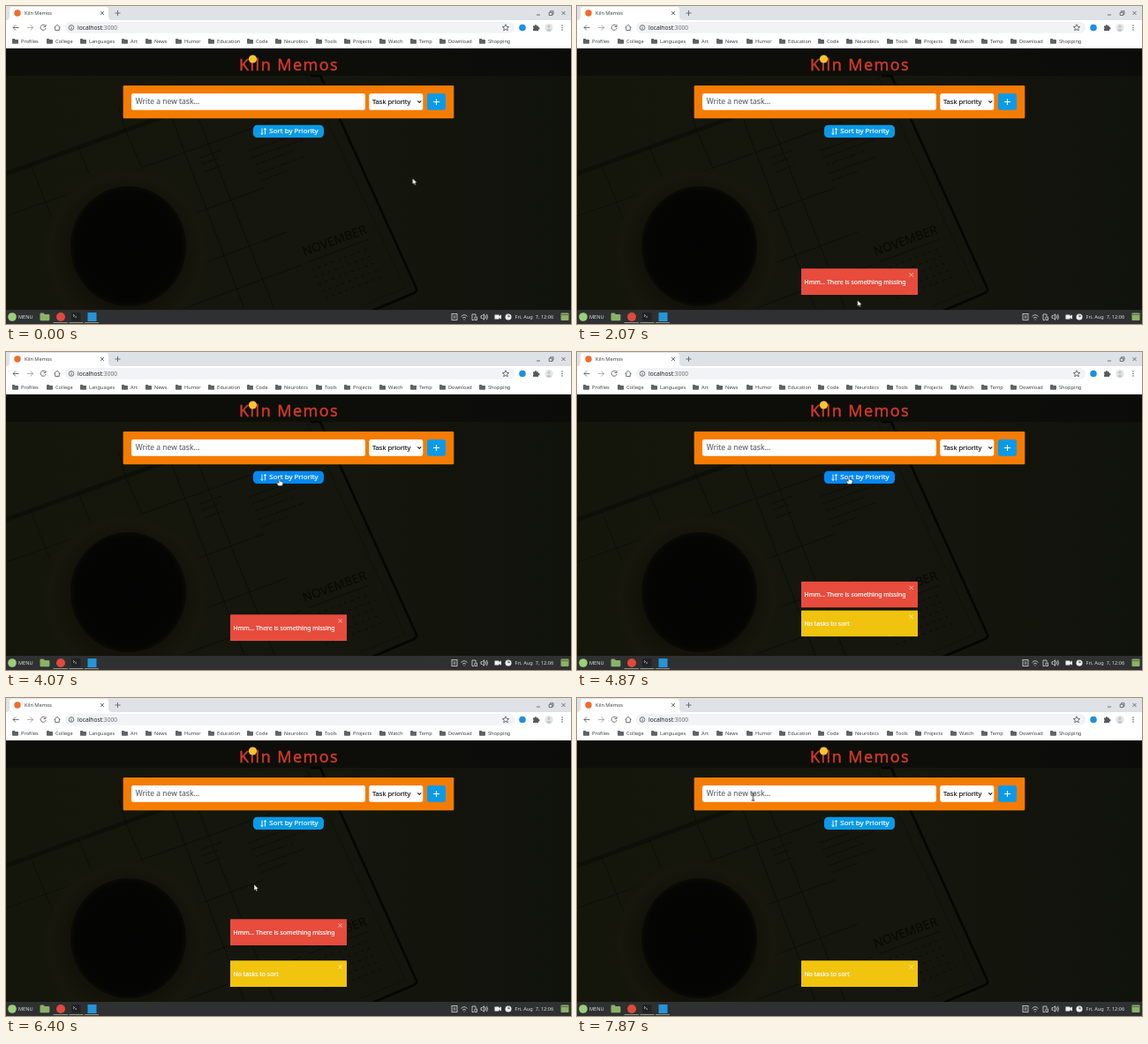
Recreate the animation shown at these times as an HTML page. Size 640 by 360 pixels, loop 8000 ms.

```html
<!DOCTYPE html>
<html lang="en">
<head>
<meta charset="utf-8">
<title>Kiln Memos</title>
<style>
html, body { margin: 0; width: 100%; height: 100%; overflow: hidden; background: #14150d; }
svg { display: block; width: 100vw; height: 100vh; font-family: "Noto Sans", "Open Sans", sans-serif; }
.ui { font-size: 5.65px; fill: #3c4043; }
.line { fill: none; stroke: #5f6368; stroke-width: .9; }
.tray { fill: none; stroke: #ddd; stroke-width: .8; }
.label { fill: #fff; stroke: #fff; stroke-width: .2; }
.anim { animation-duration: 8s; animation-iteration-count: infinite; animation-timing-function: linear; }

/* Toasts bounce in from below, and the first drops out again. */
.error { animation-name: error; animation-timing-function: ease; }
.warning { animation-name: warning; }
.lift { animation-name: lift; animation-timing-function: step-end; }
@keyframes error {
  0% { transform: translateY(1405px); opacity: 0; }
  14.89% { transform: translateY(1405px); opacity: 0; animation-timing-function: cubic-bezier(.215,.61,.355,1); }
  20.52% { transform: translateY(-9.4px); opacity: 1; animation-timing-function: cubic-bezier(.215,.61,.355,1); }
  21.92% { transform: translateY(4.7px); animation-timing-function: cubic-bezier(.215,.61,.355,1); }
  23.33% { transform: translateY(-2.35px); animation-timing-function: cubic-bezier(.215,.61,.355,1); }
  24.27%, 76.35% { transform: none; }
  78.23% { transform: translateY(4.7px); }
  80.1%, 80.57% { transform: translateY(-9.4px); opacity: 1; }
  85.73%, 100% { transform: translateY(937px); opacity: 0; }
}
@keyframes warning {
  0% { transform: translateY(1405px); opacity: 0; }
  55.81% { transform: translateY(1405px); opacity: 0; animation-timing-function: cubic-bezier(.215,.61,.355,1); }
  61.44% { transform: translateY(-9.4px); opacity: 1; animation-timing-function: cubic-bezier(.215,.61,.355,1); }
  62.84% { transform: translateY(4.7px); animation-timing-function: cubic-bezier(.215,.61,.355,1); }
  64.25% { transform: translateY(-2.35px); animation-timing-function: cubic-bezier(.215,.61,.355,1); }
  65.19%, 100% { transform: none; opacity: 1; }
}
@keyframes lift { 0% { transform: none; } 55.81%, 100% { transform: translateY(-37.5px); } }

.button { fill: #0a9ae8; }
.add { animation-name: add; }
.sort { animation-name: sort; }
@keyframes add { 0%, 8.1%, 22%, 100% { fill: #0a9ae8; } 10%, 20.4% { fill: #0a6cf8; } }
@keyframes sort { 0%, 49.9%, 64%, 100% { fill: #0a9ae8; } 50.9%, 62.2% { fill: #0489f5; } }

.pointer { animation-name: travel; animation-timing-function: ease-in-out; }
@keyframes travel {
  0%, .88% { transform: translate(460.5px,195px); }
  10.88% { transform: translate(489px,105px); }
  11.6%, 19.13% { transform: translate(490px,104px); }
  25.88% { transform: translate(317.7px,333px); animation-timing-function: linear; }
  29.1% { transform: translate(310px,323px); animation-timing-function: ease-out; }
  30.9% { transform: translate(306.5px,318.5px); }
  36.6% { transform: translate(306.5px,318.5px); animation-timing-function: ease-in; }
  41.6% { transform: translate(387px,235px); animation-timing-function: linear; }
  46.6% { transform: translate(355px,165px); animation-timing-function: linear; }
  50.9% { transform: translate(309.5px,144px); animation-timing-function: ease-out; }
  53.4%, 60.9% { transform: translate(308px,142px); }
  70%, 70.9% { transform: translate(287px,300.5px); }
  73.4% { transform: translate(288px,311px); }
  80% { transform: translate(281px,211px); animation-timing-function: linear; }
  80.9% { transform: translate(279px,206px); }
  90%, 100% { transform: translate(199.5px,112px); }
}
.arrow, .hand, .beam, .caret { animation-timing-function: step-end; }
.arrow { animation-name: arrow; }
.hand { animation-name: hand; }
.beam { animation-name: beam; }
.caret { animation-name: caret; }
@keyframes arrow {
  0%, 20.4%, 38.8%, 62.2%, 76.8% { opacity: 1; }
  8.1%, 27.9%, 49.9%, 66.8%, 88.4%, 100% { opacity: 0; }
}
@keyframes hand {
  0%, 20.4%, 38.8%, 62.2%, 76.8%, 100% { opacity: 0; }
  8.1%, 27.9%, 49.9%, 66.8% { opacity: 1; }
}
@keyframes beam { 0% { opacity: 0; } 88.4%, 100% { opacity: 1; } }
@keyframes caret { 0%, 98.3%, 100% { opacity: 0; } 91.6% { opacity: 1; } }
</style>
</head>
<body>
<svg viewBox="0 0 640 360" xmlns="http://www.w3.org/2000/svg">
  <defs>
    <clipPath id="page"><rect y="48" width="640" height="296"/></clipPath>
    <linearGradient id="desk"><stop stop-color="#15160b"/><stop offset=".6" stop-color="#15160d"/><stop offset="1" stop-color="#10120c"/></linearGradient>
    <radialGradient id="saucer"><stop offset=".66" stop-color="#121209"/><stop offset=".88" stop-color="#17170d"/><stop offset="1" stop-color="#16160b" stop-opacity="0"/></radialGradient>
    <radialGradient id="coffee"><stop stop-color="#030303"/><stop offset=".93" stop-color="#050503"/><stop offset="1" stop-color="#0a0a06"/></radialGradient>
    <g id="folder"><path d="M0 .8Q0 0 .8 0H2.6L3.5 1H6.2Q7 1 7 1.8V5Q7 5.7 6.2 5.7H.8Q0 5.7 0 5Z"/></g>
    <path id="close" d="M376.5 302.3L380.7 306.5M380.7 302.3L376.5 306.5" stroke="#fff" stroke-width=".8" opacity=".8"/>
  </defs>

  <!-- page -->
  <g clip-path="url(#page)">
    <rect y="48" width="640" height="296" fill="url(#desk)"/>
    <g fill="none" stroke="#0a0a05" stroke-width="1">
      <path d="M0 190L215 112" stroke-width="5" opacity=".6"/>
      <path d="M0 238L300 131M205 238L292 206M200 300L318 256M200 343L335 293" opacity=".65"/>
      <path d="M28 180L60 260M82 160L105 215M135 140L165 208M186 122L270 343M212 112L304 343M128 115L135 140" opacity=".65"/>
      <path d="M345 79L356 79L465 320Q466 323 462 325L415 345" stroke="#050503" stroke-width="2.6"/>
      <path d="M340 79L452 319L402 340" opacity=".4"/>
      <g stroke="#080804" stroke-width="1.1" stroke-dasharray="5 1.5 8 2 3 1.5" opacity=".5">
        <path d="M220 172L244 163M222 179L240 172M225 188L246 180"/>
        <path d="M275 164L330 145M278 172L337 151M282 180L326 164M285 190L340 170M288 198L318 187"/>
      </g>
      <g stroke="#080804" stroke-width="1.3" stroke-dasharray="3 5" opacity=".55">
        <path d="M346 299L414 273M350 307L418 281M354 315L422 289M358 323L426 297M362 331L430 305"/>
      </g>
      <path d="M342 290L411 264" opacity=".7"/>
    </g>
    <text transform="translate(338 283) rotate(-20)" font-size="14" fill="#090905">NOVEMBER</text>
    <ellipse cx="136" cy="278" rx="98" ry="100" fill="url(#saucer)"/>
    <ellipse cx="138.5" cy="272" rx="65.5" ry="68" fill="url(#coffee)"/>
    <rect y="48" width="640" height="31" fill="#080909" opacity=".55"/>
    <text x="264" y="73" font-size="18" letter-spacing="1.4" fill="#d33a2c" stroke="#d33a2c" stroke-width=".4">Kiln Memos</text>
    <circle cx="279.5" cy="60" r="4.6" fill="#fbc52d"/>

    <rect x="132.7" y="90" width="374.6" height="37.3" rx="1.2" fill="#f57c00"/>
    <rect x="142" y="99" width="265" height="18.8" rx="2.3" fill="#fff"/>
    <text x="146.7" y="111.3" font-size="8.5" fill="#5d656c" stroke="#5d656c" stroke-width=".12">Write a new task...</text>
    <path class="anim caret" d="M146.7 103.5V113.5" stroke="#333" stroke-width=".6"/>
    <rect x="411.3" y="99" width="61" height="18.8" rx="2.3" fill="#fff"/>
    <text x="415" y="111.2" font-size="7.56" fill="#111" stroke="#111" stroke-width=".15">Task priority</text>
    <path d="M466.3 107.3L468.3 109.3L470.3 107.3" fill="none" stroke="#111" stroke-width="1.1"/>
    <rect class="button anim add" x="477" y="99" width="21" height="18.8" rx="2.3"/>
    <path d="M487.5 105V112M484 108.5H491" stroke="#fff" stroke-width="1.1"/>

    <rect class="button anim sort" x="280" y="134.8" width="80" height="14.2" rx="4.5"/>
    <path d="M290 138.5V145.5M288.5 143.8L290 145.5L291.5 143.8M293.5 145.5V138.5M292 140.2L293.5 138.5L295 140.2" fill="none" stroke="#fff" stroke-width=".9"/>
    <text class="label" x="298.3" y="144.4" font-size="7.95">Sort by Priority</text>

    <g class="anim lift"><g class="anim error">
      <rect x="254" y="297.2" width="132" height="29.8" rx=".5" fill="#e74c3c"/>
      <text class="label" x="257.5" y="314.7" font-size="6.95">Hmm... There is something missing</text>
      <use href="#close"/>
    </g></g>
    <g class="anim warning">
      <rect x="254" y="297.2" width="132" height="29.8" rx=".5" fill="#f1c40f"/>
      <text class="label" x="257.5" y="314.7" font-size="6.95">No tasks to sort</text>
      <use href="#close"/>
    </g>
  </g>

  <!-- browser -->
  <rect width="640" height="48" fill="#fff"/>
  <rect width="640" height="16" fill="#dee1e6"/>
  <path d="M0 16Q4 16 4 12V4Q4 1 7.5 1H113Q116 1 116 4V12Q116 16 120 16Z" fill="#fff"/>
  <circle cx="13" cy="8" r="3.7" fill="#f4692c"/>
  <text class="ui" x="21" y="10.1">Kiln Memos</text>
  <path class="line" d="M107 6L111 10M111 6L107 10M123.5 8H129.5M126.5 5V11"/>
  <path class="line" d="M601 10H605M615.2 7.2H618.8V10.5H615.2ZM616.5 7V5.8H620V9.3H619M629.5 6L633.5 10M633.5 6L629.5 10"/>
  <path class="line" d="M14.5 24.5H8M11 21.5L8 24.5L11 27.5"/>
  <path class="line" d="M24 24.5H30.5M27.5 21.5L30.5 24.5L27.5 27.5" opacity=".55"/>
  <path class="line" d="M43.300 22.300A3 3 0 1 0 44 25M44 21V23.500H41.500" transform="translate(1 0)"/>
  <path class="line" d="M54.500 24.500L58 21.300L61.500 24.500M55.700 24V27.500H60.300V24"/>
  <rect x="67" y="18" width="509" height="12.8" rx="6.4" fill="#f1f3f4"/>
  <circle class="line" cx="74" cy="24.5" r="2.8"/>
  <path class="line" d="M74 24V26.2M74 22.7V23.3"/>
  <text x="81" y="26.9" font-size="6.65" fill="#202124">localhost<tspan fill="#6b7075">:3000</tspan></text>
  <path class="line" d="M566 20.8L567.1 23.3L569.7 23.5L567.7 25.2L568.3 27.8L566 26.4L563.7 27.8L564.3 25.2L562.3 23.5L564.9 23.3Z" stroke-width=".7"/>
  <circle cx="585" cy="24.5" r="3.8" fill="#1b91df"/>
  <path d="M597 22.5H598.7A1.3 1.3 0 1 1 601.3 22.5H603V24.2A1.2 1.2 0 1 1 603 26.5V28H597V26.2A1.1 1.1 0 0 0 597 24.2Z" fill="#55595e"/>
  <circle cx="615" cy="24.5" r="4.6" fill="#e3e5e8"/>
  <path d="M615 21.5A1.7 1.7 0 1 1 614.9 21.5M611.8 27.8Q615 23.8 618.2 27.8Q615 30 611.8 27.8Z" fill="#c3c8cd"/>
  <g fill="#5f6368"><circle cx="630" cy="22" r=".8"/><circle cx="630" cy="24.5" r=".8"/><circle cx="630" cy="27" r=".8"/></g>
  <g id="bookmarks" class="ui"></g>

  <!-- taskbar -->
  <rect y="344" width="640" height="16" fill="#2f3031"/>
  <circle cx="7" cy="352" r="4.8" fill="#9bcf7a"/>
  <text class="ui" x="14" y="354.1" style="fill:#ddd">MENU</text>
  <use href="#folder" transform="translate(38.5 347.5) scale(1.55)" fill="#8bb267"/>
  <path d="M53.5 358.5H70M71.5 358.5H87.5M89 358.5H105" stroke="#a9b5a0" stroke-width=".8"/>
  <circle cx="62" cy="352" r="5" fill="#df4a3c"/>
  <rect x="74" y="347" width="10.5" height="9.5" rx="1" fill="#202223"/>
  <path class="tray" d="M76 349.3L77.5 350.5L76 351.7M78.2 352H80" stroke-width=".6"/>
  <rect x="92.5" y="347" width="10" height="10" fill="#2495d8"/>
  <g class="tray">
    <rect x="505" y="348.5" width="6" height="7"/><path d="M506.5 351H509.5M506.5 353H509.5"/>
    <path d="M515.5 351.5Q519 347.8 522.5 351.5M517 353.3Q519 351.3 521 353.3M519 354.5V355.5"/>
    <path d="M528 349H532V351M528 349V355.5H530M531 352H533.5V355.5H531Z"/>
    <path d="M538 350.7H539.5L541.5 348.7V355.3L539.5 353.3H538ZM543 350Q544.5 352 543 354M544.5 348.8Q546.5 352 544.5 355.2"/>
  </g>
  <path d="M553.5 349.5H558.5V351L561 349.5V354.5L558.5 353V354.5H553.5Z" fill="#eee"/>
  <circle cx="569" cy="352" r="3.5" fill="#eee"/>
  <path d="M569 352V349.5M569 352L571 350.8" stroke="#333" stroke-width=".8"/>
  <text class="ui" x="576.5" y="354.1" xml:space="preserve" style="fill:#ddd">Fri, Aug  7, 12:06</text>
  <rect x="628.5" y="347.5" width="9" height="8.5" rx="1" fill="#8bb267"/>
  <path d="M628.5 349.5H637.5" stroke="#54743a"/>

  <g class="anim pointer">
    <path class="anim arrow" d="M0 0V7L1.6 5.6L2.7 7.9L3.9 7.3L2.9 5.1H5Z" fill="#fff" stroke="#111" stroke-width=".5"/>
    <path class="anim hand" d="M-.8-.2Q0-1.5.8-.2V2.3L3.6 3.1Q4.5 3.6 4 5.2L3.2 7.6H-1.2L-3 4.8Q-3 3.4-1.6 4L-.8 4.6Z" fill="#fff" stroke="#111" stroke-width=".55"/>
    <path class="anim beam" d="M-1.7-4H1.7M0-4V4M-1.7 4H1.7" fill="none" stroke="#111" stroke-width=".9"/>
  </g>
</svg>
<script>
const bookmarks = {
  Profiles: 17, College: 56, Languages: 94, Art: 141, News: 168, Humor: 202, Education: 239, Code: 283,
  Neurobics: 315, Tools: 361, Projects: 393, Watch: 433, Temp: 468, Download: 501, Shopping: 546
};
document.getElementById("bookmarks").innerHTML = Object.entries(bookmarks).map(([name, x]) =>
  `<use href="#folder" x="${x - 10}" y="37" fill="#5f6368"/><text x="${x}" y="42">${name}</text>`).join("");
</script>
</body>
</html>
```
